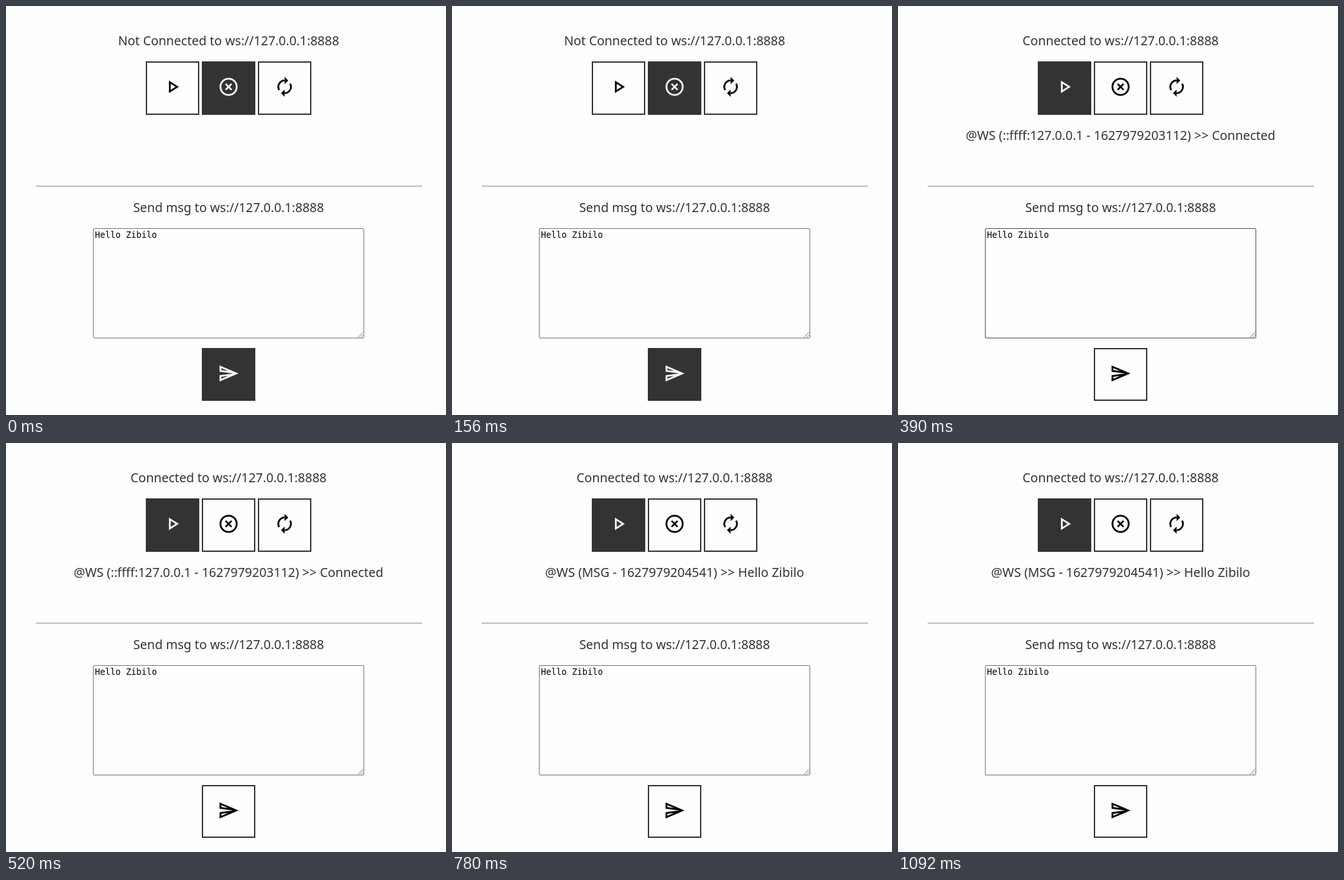
An HTML page for the animation above (1300 ms loop, 683 by 635 pixels).

```html
<!DOCTYPE html>
<html lang="en">
<head>
<meta charset="utf-8">
<title>WebSocket client</title>
<style>
  html, body { margin: 0; width: 100%; height: 100%; overflow: hidden; background: #fefefe; }
  svg { display: block; }

  .line { font: 19.5px "Noto Sans", "Open Sans", sans-serif; text-anchor: middle; fill: #333; }
  .typed { font: 13.333px "DejaVu Sans Mono", monospace; fill: #000; }

  .button { fill: #fefefe; color: #000; }
  .button rect { stroke: #333; stroke-width: 2; }
  .solid { fill: currentColor; fill-rule: evenodd; }
  .stroked { fill: none; stroke: currentColor; stroke-width: 2; }

  /* Every change is a hard cut within one 1300 ms loop. */
  .step { animation: 1300ms step-end infinite; }
  .offline { animation-name: offline; }
  .online { animation-name: online; }
  .joined { animation-name: joined; }
  .echo { animation-name: echo; }
  .pressed-offline { animation-name: pressed-offline; }
  .pressed-online { animation-name: pressed-online; }
  .field { fill: #fefefe; stroke: #767676; animation-name: field; }

  @keyframes offline { 0% { opacity: 1 } 20%, 100% { opacity: 0 } }
  @keyframes online { 0% { opacity: 0 } 20%, 100% { opacity: 1 } }
  @keyframes joined { 0% { opacity: 0 } 20% { opacity: 1 } 60%, 100% { opacity: 0 } }
  @keyframes echo { 0% { opacity: 0 } 60%, 100% { opacity: 1 } }
  @keyframes pressed-offline {
    0% { fill: #333; color: #f4f4f4 }
    20%, 100% { fill: #fefefe; color: #000 }
  }
  @keyframes pressed-online {
    0% { fill: #fefefe; color: #000 }
    20%, 100% { fill: #333; color: #f4f4f4 }
  }
  @keyframes field {
    0% { stroke: #767676 }
    30% { stroke: #4c4c4c }
    40%, 100% { stroke: #767676 }
  }
</style>
</head>
<body>
<svg width="683" height="635" viewBox="0 0 683 635">
  <defs>
    <path id="arrow-arc" d="M12 5A7 7 0 0 0 5.97 15.53"/>
    <path id="arrow-head" d="M12 1l4 4-4 4z"/>
  </defs>

  <text class="line step offline" x="345.5" y="61">Not Connected to ws://127.0.0.1:8888</text>
  <text class="line step online" x="345.5" y="61">Connected to ws://127.0.0.1:8888</text>

  <g class="button step pressed-online" transform="translate(217 86)">
    <rect x="1" y="1" width="81" height="81"/>
    <g transform="translate(41.5 39.5) scale(1.4) translate(-12 -12)">
      <path class="solid" d="M8 5v14l11-7zM10 8.64L15.27 12 10 15.36z"/>
    </g>
  </g>

  <g class="button step pressed-offline" transform="translate(304 86)">
    <rect x="1" y="1" width="81" height="81"/>
    <g transform="translate(41.5 39.5) scale(1.4) translate(-12 -12)">
      <circle class="stroked" cx="12" cy="12" r="9"/>
      <path class="stroked" d="M8.7 8.7l6.6 6.6M15.3 8.7l-6.6 6.6"/>
    </g>
  </g>

  <g class="button" transform="translate(391 86)">
    <rect x="1" y="1" width="81" height="81"/>
    <g transform="translate(41.5 39.5) scale(1.4) translate(-12 -12)">
      <use href="#arrow-arc" class="stroked"/>
      <use href="#arrow-head" class="solid"/>
      <g transform="rotate(180 12 12)">
        <use href="#arrow-arc" class="stroked"/>
        <use href="#arrow-head" class="solid"/>
      </g>
    </g>
  </g>

  <text class="line step joined" x="345.5" y="208">@WS (::ffff:127.0.0.1 - 1627979203112) &gt;&gt; Connected</text>
  <text class="line step echo" x="345.5" y="208">@WS (MSG - 1627979204541) &gt;&gt; Hello Zibilo</text>

  <rect x="46" y="279" width="600" height="1" fill="#9a9a9a"/>
  <rect x="46" y="280" width="600" height="1" fill="#e6e6e6"/>

  <text class="line" x="345.5" y="320">Send msg to ws://127.0.0.1:8888</text>

  <rect class="step field" x="135.5" y="345.5" width="420" height="170" rx="1.5"/>
  <text class="typed" x="138" y="360">Hello Zibilo</text>
  <path d="M546.5 514.5l8-8M551 514.5l3.5-3.5" fill="none" stroke="#777"/>

  <g class="button step pressed-offline" transform="translate(304 531)">
    <rect x="1" y="1" width="81" height="80"/>
    <g transform="translate(41.5 39.5) scale(1.4) translate(-12 -12)">
      <path class="solid" d="M4 6.03l7.52 3.22L4 8.25zM11.51 14.75L4 17.97v-2.22zM2 3v7l15 2-15 2v7l21-9z"/>
    </g>
  </g>
</svg>
</body>
</html>
```
